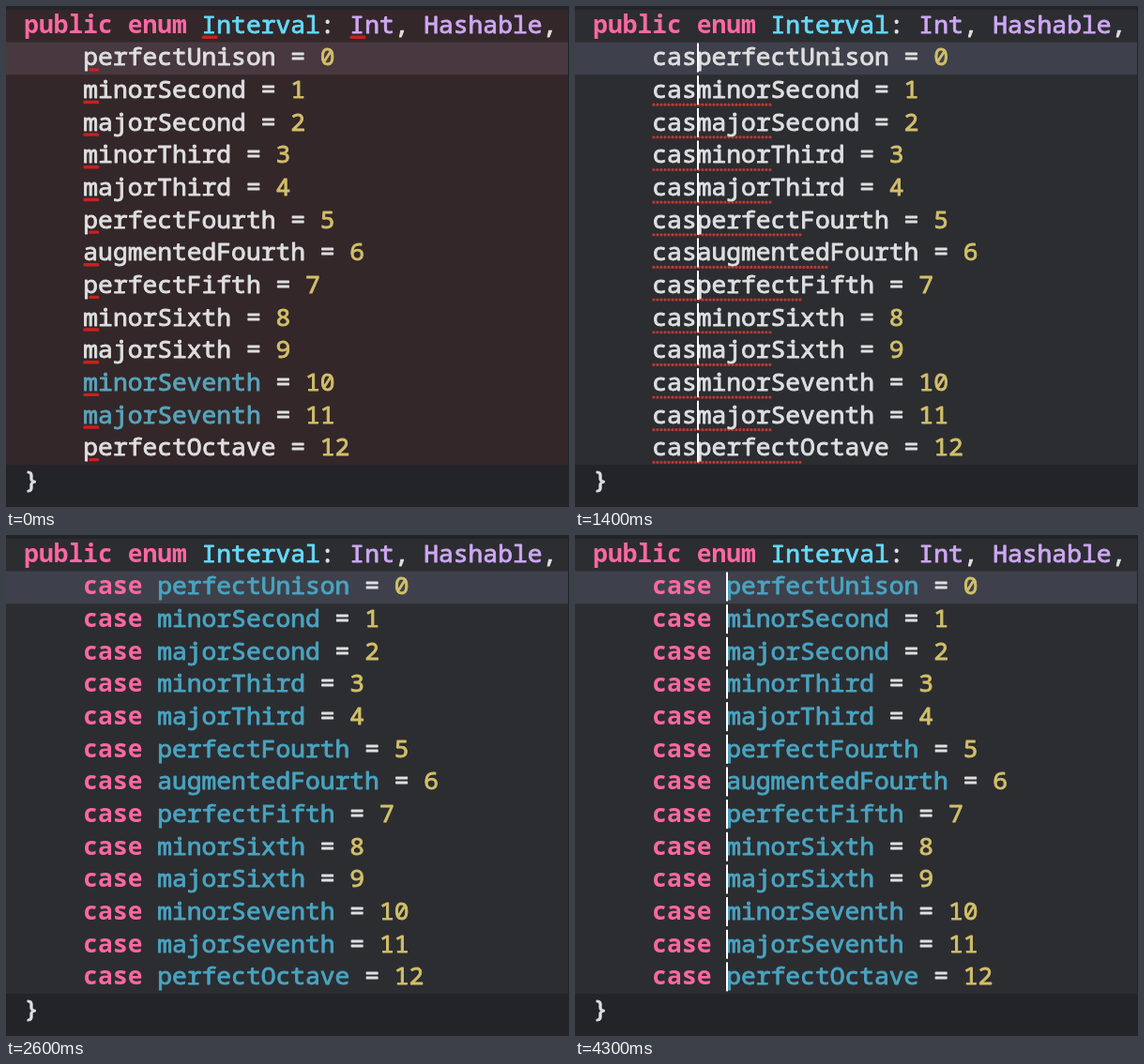
An HTML page with a canvas that plays this animation: 600 px wide and 534 px high, repeating every 4400 ms.

```html
<!DOCTYPE html>
<html>
<head>
<meta charset="utf-8">
<title>Typing with many cursors</title>
<style>
  html, body { margin: 0; width: 100%; height: 100%; overflow: hidden; background: #232428; }
  canvas { display: block; }
</style>
</head>
<body>
<canvas id="stage" width="600" height="534"></canvas>
<script>
const ctx = document.getElementById('stage').getContext('2d');
const LOOP = 4400;
const LEFT = 19.2, TOP = 3.9, COL = 15.78, ROW = 34.65, BASE = 24.8;
const NAMES = ['perfectUnison', 'minorSecond', 'majorSecond', 'minorThird', 'majorThird',
  'perfectFourth', 'augmentedFourth', 'perfectFifth', 'minorSixth', 'majorSixth',
  'minorSeventh', 'majorSeventh', 'perfectOctave'];
const INK = { plain: '#dfdfe0', key: '#fc68a2', type: '#65daf9', lib: '#cea8f4',
  num: '#d2bf69', member: '#49a4c1', stale: '#58a5ba', error: '#c9211f', spell: '#c03833' };
// When each letter of "case " has been typed
const KEYS = [300, 800, 1300, 1700, 2000];
const WORD = 'case ';
const BLINK = 560;

const colX = col => LEFT + col * COL;
const rowY = row => TOP + row * ROW;

function rect(x, y, w, h, color) {
  ctx.fillStyle = color;
  ctx.fillRect(x, y, w, h);
}

// Draws text on the character grid and returns the next column
function put(text, col, row, color, bold) {
  const x = colX(col), y = rowY(row) + BASE;
  ctx.font = (bold ? 700 : 400) + ' 26.3px "Noto Sans Mono", "DejaVu Sans Mono", monospace';
  ctx.fillStyle = ctx.strokeStyle = color;
  ctx.fillText(text, x, y);
  if (!bold) {
    // A thin outline gives a medium weight
    ctx.lineWidth = 0.9;
    ctx.lineJoin = 'round';
    ctx.strokeText(text, x, y);
  }
  return col + text.length;
}

function errorMark(col, row, skip = 0) {
  ctx.fillStyle = INK.error;
  ctx.beginPath();
  ctx.roundRect(colX(col) + skip, rowY(row) + BASE + 2.8, 17 - skip, 3.4, 1.5);
  ctx.fill();
}

function dots(col, row, count) {
  const end = colX(col + count), y = rowY(row) + BASE + 7.2;
  ctx.fillStyle = INK.spell;
  ctx.beginPath();
  for (let x = colX(col) + 1.6; x < end; x += 4) {
    ctx.moveTo(x + 1.6, y);
    ctx.arc(x, y, 1.6, 0, Math.PI * 2);
  }
  ctx.fill();
}

function header(broken) {
  if (broken) {
    errorMark(12, 0);
    errorMark(22, 0);
  }
  let col = put('public enum ', 0, 0, INK.key, true);
  col = put('Interval', col, 0, INK.type);
  col = put(': ', col, 0, INK.plain);
  col = put('Int', col, 0, INK.lib);
  col = put(', ', col, 0, INK.plain);
  col = put('Hashable', col, 0, INK.lib);
  put(',', col, 0, INK.plain);
}

function line(name, i, typed) {
  const row = i + 1, done = typed === WORD.length;
  let ink = INK.plain;
  if (done) ink = INK.member;
  else if (!typed && name.endsWith('Seventh')) ink = INK.stale;

  if (!typed) errorMark(4, row, name[0] === 'p' ? 6 : 0);
  const first = name.match(/^[a-z]+/)[0];
  const checked = i > 0 && !(typed === 4 && first === 'major');
  if (typed && !done && checked) dots(4, row, typed + first.length);

  let col = put(WORD.slice(0, typed), 4, row, done ? INK.key : INK.plain, done);
  col = put(name, col, row, ink);
  col = put(' = ', col, row, INK.plain);
  put(String(i), col, row, INK.num);
}

function caretOn(t) {
  if (t < KEYS[0]) return false;
  const last = KEYS[KEYS.length - 1];
  return t < last || Math.floor((t - last) / BLINK) % 2 === 0;
}

function draw(t) {
  const typed = KEYS.filter(k => t >= k).length;
  const broken = typed === 0;
  rect(0, 0, 600, 534, '#232428');
  rect(0, TOP, 599, ROW * 14, broken ? '#33272a' : '#2c2d31');
  rect(0, rowY(1), 599, ROW, broken ? '#48383f' : '#3e414b');

  header(broken);
  NAMES.forEach((name, i) => line(name, i, typed));
  put('}', 0, 14, INK.plain);

  if (caretOn(t)) {
    const x = Math.round(colX(4 + typed));
    NAMES.forEach((_, i) => rect(x, rowY(i + 1) + 1, 2, 31, '#ffffff'));
  }
}

function tick() {
  draw(performance.now() % LOOP);
  requestAnimationFrame(tick);
}
tick();
</script>
</body>
</html>
```
